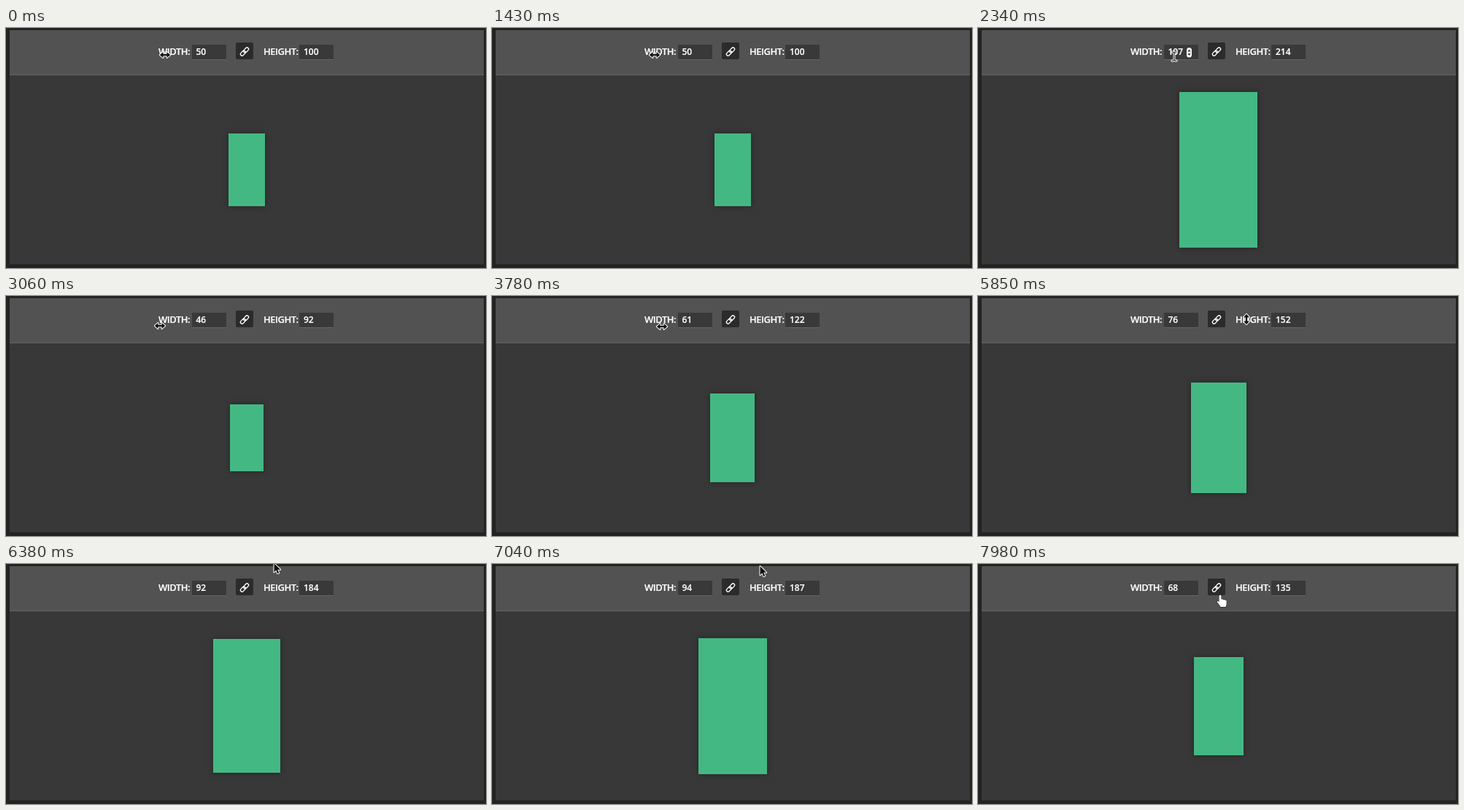
These frames come from a looping animation (658x330 px, 8 s). An HTML page:

```html
<!DOCTYPE html>
<html>
<head>
<meta charset="utf-8">
<style>
  html, body { margin: 0; width: 100%; height: 100%; overflow: hidden; background: #232323; }
  svg { display: block; }
  text { font: 600 12px "Open Sans", "Noto Sans", sans-serif; fill: #fff; stroke: #fff; stroke-width: .2px; }
  .label { font-size: 13px; letter-spacing: -.5px; }
  #box { fill: #43b883; filter: drop-shadow(0 0 4px rgba(0, 0, 0, .35)); }
  .cursor { fill: #111; stroke: #fff; stroke-width: 2px; stroke-linejoin: round; paint-order: stroke; }
  #pointer { fill: #fff; stroke: #111; stroke-width: 1px; }
</style>
</head>
<body>
<svg width="658" height="330">
  <path fill="#383838" d="M5 65h650v260H5z"/>
  <path fill="#525252" d="M5 3h650v61H5z"/>
  <path fill="#656565" d="M5 64h650v1H5z"/>
  <path fill="#393939" d="M255 23h47v20h-47zM402 23h47v20h-47z"/>
  <path fill="#666" d="M255 43h47v1h-47zM402 43h47v1h-47z"/>
  <rect x="315" y="20" width="24" height="23" rx="2" fill="#2b2b2b"/>
  <g transform="translate(327 32.5) rotate(-45)" fill="none" stroke="#fff" stroke-width="1.3">
    <rect x="-7" y="-2.2" width="8" height="4.4" rx="2.2"/>
    <rect x="-1" y="-2.2" width="8" height="4.4" rx="2.2"/>
  </g>
  <text class="label" x="209" y="37">WIDTH:</text>
  <text class="label" x="353" y="37">HEIGHT:</text>
  <text id="width" x="260.5" y="37"></text>
  <text id="height" x="408" y="37"></text>
  <g id="spinner">
    <rect x="286" y="27" width="7" height="13.5" rx="3.5" fill="#fff"/>
    <path fill="#333" d="M287.400 32.500l2.100-3 2.100 3zM287.400 35l2.100 3 2.100-3z"/>
  </g>
  <rect id="box"/>
  <path class="cursor" id="ew" d="M-7.200 0l4.600-4v2.800h5.200V-4L7.200 0 2.600 4V1.200h-5.200V4z"/>
  <path class="cursor" id="ns" d="M0-7.200l4 4.600H1.200v5.200H4L0 7.200-4 2.600h2.800v-5.200H-4z"/>
  <path class="cursor" id="beam" d="M-3.500-6.500h2.500l1 1 1-1h2.500v1h-2l-1 1v9l1 1h2v1H1l-1-1-1 1h-2.500v-1h2l1-1v-9l-1-1h-2z"/>
  <path class="cursor" id="arrow" d="M.5-1v12.200l2.800-2.700 2 4.700 2-.9-2-4.500h3.900z"/>
  <path class="cursor" id="pointer" d="M-1.500 10V1a1.500 1.500 0 0 1 3 0v5c.3-1 2.500-1 2.700.5.5-1 2.300-.8 2.500.6.6-.8 2-.4 2 1v4c0 1.500-1 2-1 4H.5c0-1.500-3-4-4.500-6.500-.8-1.300.8-2.300 2-1z"/>
</svg>
<script>
const LOOP = 8000, STEP = 35;
const WIDTH_DRAG_END = 3930, HEIGHT_DRAG_END = 7620;
const $ = id => document.getElementById(id);
const easeOut = u => Math.sin(u * Math.PI / 2);
const linear = u => u;

// Pointer strokes: start, end, target x and y, easing.
const strokes = [
  [1395, 2070, 281, 39],
  [2250, 2830, 217, 40],
  [2965, 3340, 197, 42],
  [3505, WIDTH_DRAG_END, 243, 42],
  [4045, 4630, 368, 36],
  [5765, 6600, 367, -15, linear],
  [6610, 6710, 367, -28],
  [6825, HEIGHT_DRAG_END, 367, 51],
  [7795, 7980, 332, 43]
];

function pointerAt(t) {
  let x = 218, y = 37;
  for (const [start, end, toX, toY, ease = easeOut] of strokes) {
    if (t < start) break;
    const held = t < end ? Math.floor((t - start) / STEP) * STEP : end - start;
    const p = ease(held / (end - start));
    x += (toX - x) * p;
    y += (toY - y) * p;
  }
  return { x: Math.round(x), y: Math.round(y) };
}

// The box follows the drag one update late: first by width, later by height.
function boxHeightAt(t) {
  const late = t - STEP;
  return late < 4630
    ? 2 * (pointerAt(Math.min(late, WIDTH_DRAG_END)).x - 168)
    : 186 - pointerAt(Math.min(late, HEIGHT_DRAG_END)).y;
}

function cursorAt(x, y) {
  const over = (left, right, top = 23, bottom = 44) => x >= left && x <= right && y >= top && y <= bottom;
  if (over(209, 253)) return "ew";
  if (over(353, 400)) return "ns";
  if (over(255, 302)) return "beam";
  if (over(315, 339, 20)) return "pointer";
  return "arrow";
}

function draw(t) {
  const h = boxHeightAt(t), w = Math.round(h / 2);
  const box = { x: Math.floor(330 - w / 2), y: Math.round(195 - h / 2), width: w, height: h };
  for (const name in box) $("box").setAttribute(name, box[name]);
  $("width").textContent = w;
  $("height").textContent = h;

  const { x, y } = pointerAt(t);
  const kind = cursorAt(x, y);
  for (const c of document.querySelectorAll(".cursor")) {
    c.style.display = c.id === kind ? "" : "none";
    c.setAttribute("transform", `translate(${x} ${y})`);
  }
  $("spinner").style.display = kind === "beam" ? "" : "none";
}

const begin = performance.now();
function tick() {
  draw((performance.now() - begin) % LOOP);
  requestAnimationFrame(tick);
}
tick();
</script>
</body>
</html>
```
